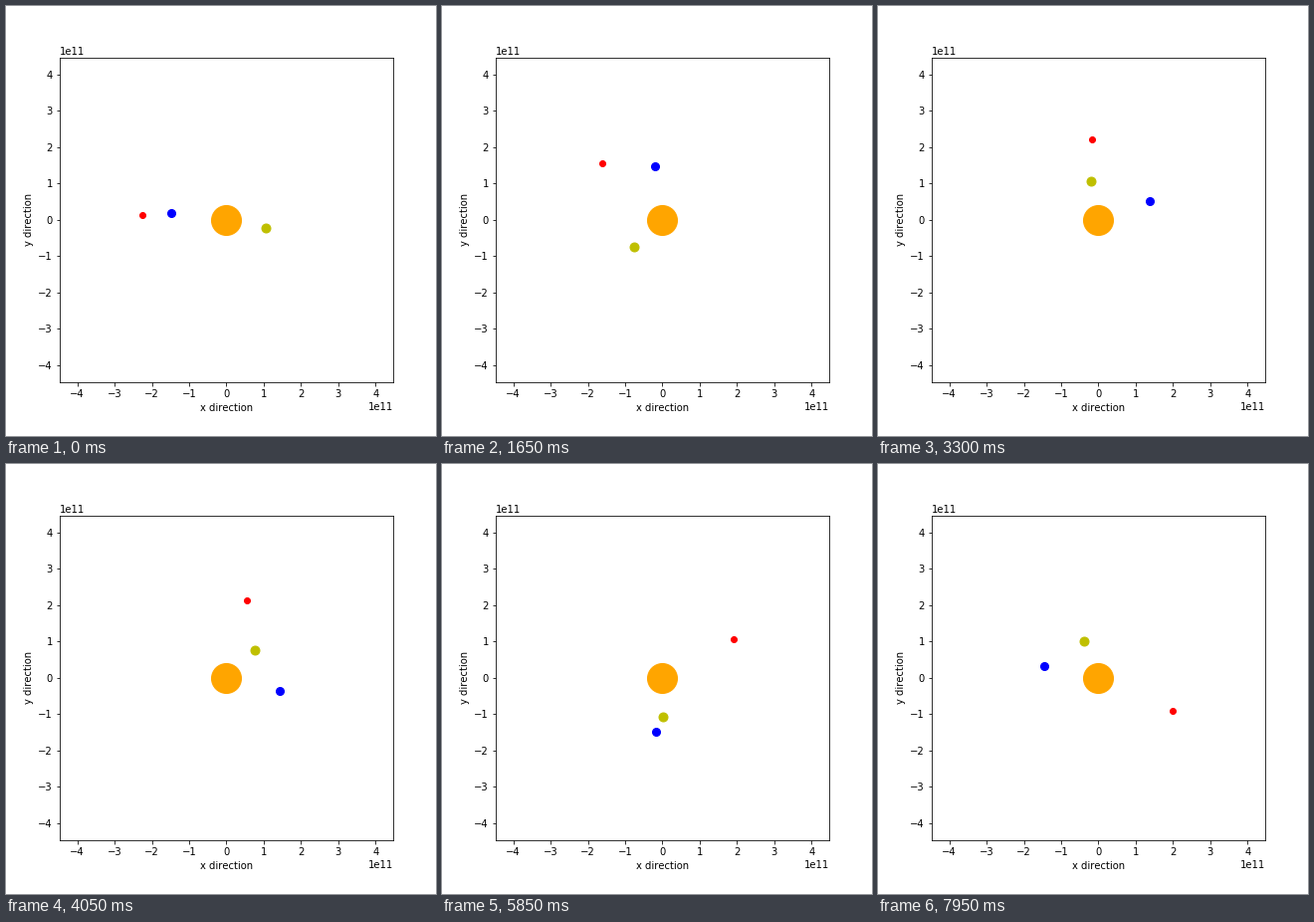
Write a matplotlib script that moves like this. It is 432 px wide and 432 px high and loops after 8 s.

```python
import numpy as np
import matplotlib.pyplot as plt
from matplotlib.animation import FuncAnimation

FRAMES = 160
INTERVAL = 50       # ms
AU = 1.49e11        # m
GM = 1.3274e20      # pull of the central star
SUBSTEPS = 5
DT = 39850          # s per substep
LEAD = 3            # steps already travelled when the loop begins

plt.rcParams["text.kerning_factor"] = 6


def orbit(x, vy):
    """Positions per frame of a body released on the x axis at speed vy."""
    pos, vel = np.array([x, 0.0]), np.array([0.0, vy])
    path = [pos.copy()]
    for _ in range(LEAD + FRAMES):
        for _ in range(SUBSTEPS):
            vel -= GM * pos / np.hypot(*pos) ** 3 * DT
            pos += vel * DT
        path.append(pos.copy())
    return path[LEAD:]


fig = plt.figure(figsize=(6, 6), dpi=72)
fig.subplots_adjust(left=0.125, right=0.9, bottom=0.125, top=0.88)
ax = fig.add_subplot(xlim=(-3 * AU, 3 * AU), ylim=(-3 * AU, 3 * AU),
                     xlabel="x direction", ylabel="y direction")


def body(color, size):
    return ax.plot([0], [0], "o", color=color, markersize=size)[0]


body("orange", 30)
planets = [
    (body("y", 9), orbit(0.723 * AU, -35020)),
    (body("b", 8), orbit(-AU, 29783)),
    (body("r", 6), orbit(-1.51 * AU, 24130)),
]


def update(i):
    for dot, path in planets:
        x, y = path[i]
        dot.set_data([x], [y])
    return [dot for dot, _ in planets]


anim = FuncAnimation(fig, update, frames=FRAMES, interval=INTERVAL,
                     repeat=True, repeat_delay=0)
plt.show()
```
